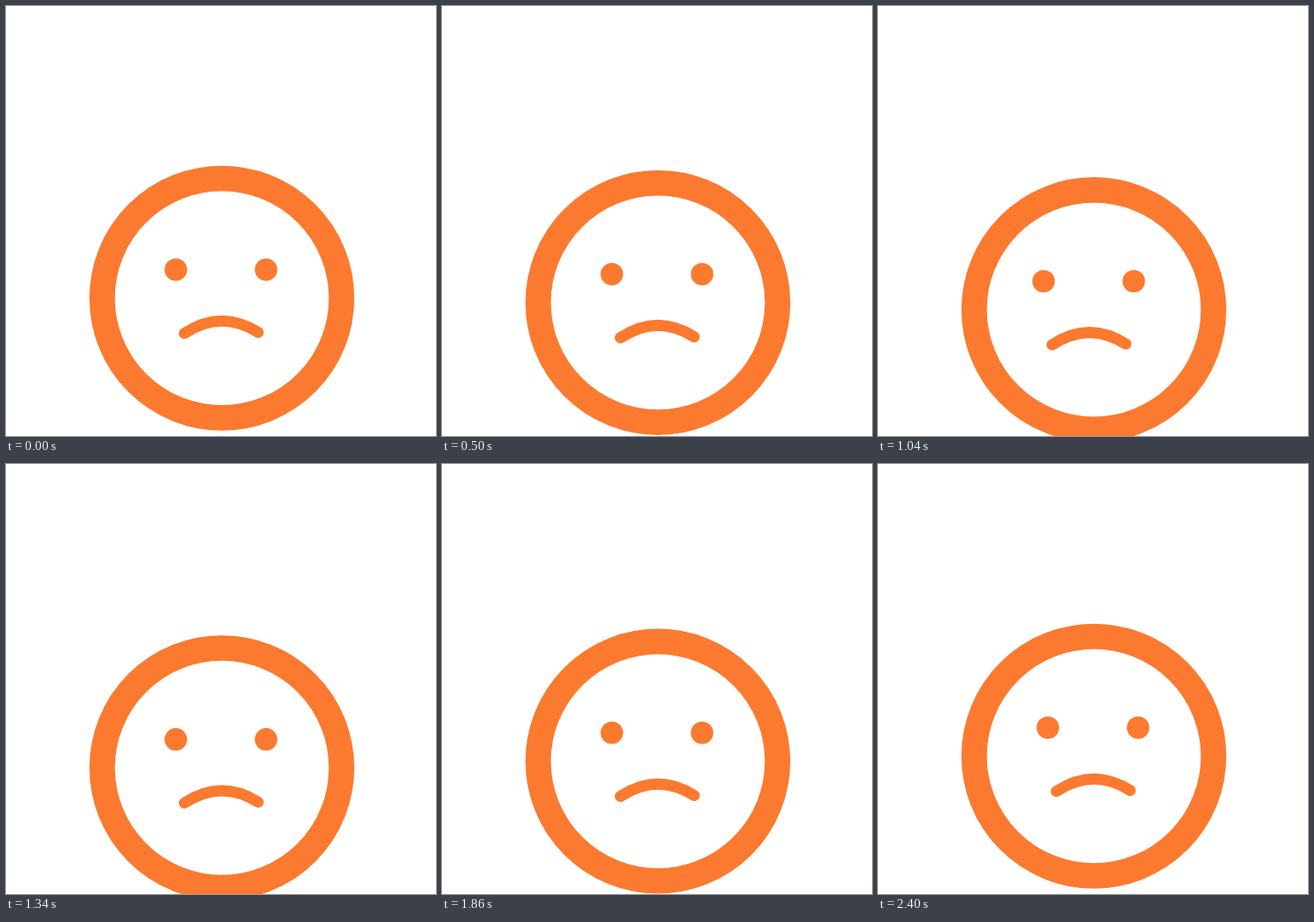
Recreate the animation shown at these times as an HTML page. Size 500 by 500 pixels, loop 2420 ms.

```html
<!DOCTYPE html>
<html lang="en">
<head>
<meta charset="utf-8">
<title>Sad face</title>
<style>
  html, body { margin: 0; width: 100%; height: 100%; overflow: hidden; background: #fff; }
  svg { display: block; width: 500px; height: 500px; }
</style>
</head>
<body>
<svg viewBox="0 0 500 500">
  <g id="head" fill="none" stroke="#fb7a2f">
    <circle cx="251" cy="339.7" r="139.2" stroke-width="29.6"/>
    <g id="face">
      <g fill="#fb7a2f" stroke="none">
        <circle cx="197.5" cy="306.6" r="13.1"/>
        <circle cx="302.4" cy="306.6" r="13.1"/>
      </g>
      <path d="M207.4 380.6Q250.5 352.4 293.2 379.6" stroke-width="13" stroke-linecap="round"/>
    </g>
  </g>
</svg>
<script>
const LOOP = 2420, STEP = 20, BOB = 2400, DROP = 14;
// Sideways glance: [time, x]
const GLANCE = [[0, 0], [580, 0], [800, 5], [1040, -5], [1260, 0], [LOOP, 0]];
const head = document.getElementById('head');
const face = document.getElementById('face');

const wave = p => (1 - Math.cos(Math.PI * p)) / 2;

function glance(t) {
  const i = GLANCE.findIndex(k => t < k[0]);
  const [t0, x0] = GLANCE[i - 1], [t1, x1] = GLANCE[i];
  return x0 + (x1 - x0) * wave((t - t0) / (t1 - t0));
}

function draw(t) {
  const y = DROP * wave(2 * t / BOB);
  head.setAttribute('transform', `translate(0 ${y.toFixed(2)})`);
  face.setAttribute('transform', `translate(${glance(t).toFixed(2)} 0)`);
}

const start = performance.now();
function tick() {
  const t = (performance.now() - start) % LOOP;
  draw(Math.floor(t / STEP) * STEP);
  requestAnimationFrame(tick);
}
draw(0);
requestAnimationFrame(tick);
</script>
</body>
</html>
```
